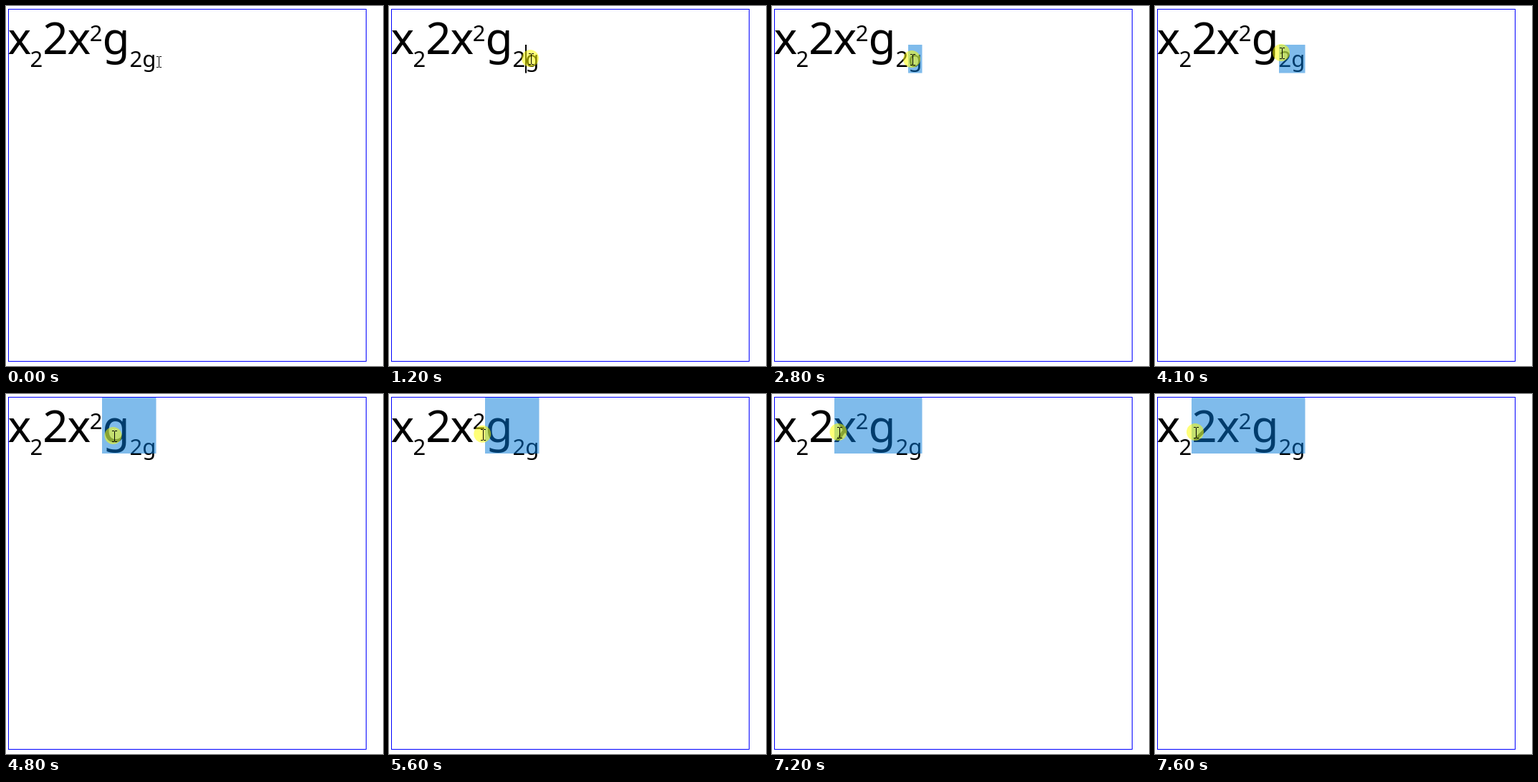
An HTML page with a canvas for the animation above (8000 ms loop, 526 by 502 pixels).

```html
<!DOCTYPE html>
<html lang="en">
<head>
<meta charset="utf-8">
<title>Text selection</title>
<style>
html, body { margin: 0; width: 100%; height: 100%; overflow: hidden; background: #fff; }
canvas { display: block; }
</style>
</head>
<body>
<canvas id="stage" width="526" height="502"></canvas>
<script>
const ctx = document.getElementById('stage').getContext('2d');
const LOOP = 8000, STEP = 100, END = 209.5;

// Text runs: baseline, font size, and the selection's top and bottom when it starts there
const BIG = { base: 67, size: 62, top: 5, bottom: 83 };
const SUB = { base: 85, size: 31, top: 54, bottom: 93.5 };
const SUP = { base: 49, size: 31, top: 18, bottom: 93.5 };

const glyphs = [
  ['x', 4, BIG], ['2', 33.6, SUB], ['2', 51.3, BIG], ['x', 86.8, BIG],
  ['2', 116.8, SUP], ['g', 134.3, BIG], ['2', 172.6, SUB], ['g', 190.3, SUB]
].map(([char, left, run], i, all) => {
  const right = i + 1 < all.length ? all[i + 1][1] : END;
  return { char, left, run, mid: (left + right) / 2 };
});

// Pointer path: time, x, y
const path = [
  [0, 211.5, 77], [300, 201, 74], [600, 201, 74], [700, 199.5, 73],
  [900, 199.5, 73], [1200, 197, 73], [1500, 197, 73], [2000, 204, 74],
  [2100, 204, 74], [2200, 206, 74], [2300, 206, 74], [2800, 195, 74],
  [2900, 195, 74], [3300, 184, 70], [3400, 184, 70], [3600, 179.8, 69],
  [3800, 179.8, 69], [4100, 176, 65], [4700, 152.1, 58], [4800, 149.5, 58],
  [5000, 148, 58], [5200, 148, 58], [5900, 117, 54], [6200, 117, 54],
  [6300, 116.5, 53.5], [6400, 116.5, 53.5], [6700, 94, 53], [7100, 94, 53],
  [7200, 92.5, 53], [7300, 92.5, 53], [7600, 56, 53], [LOOP, 56, 53]
];

const within = (t, from, to) => t >= from && t < to;

function pointerAt(t) {
  const i = path.findIndex(key => key[0] > t);
  const [t0, x0, y0] = path[i - 1], [t1, x1, y1] = path[i];
  const k = (t - t0) / (t1 - t0);
  return { x: x0 + (x1 - x0) * k, y: y0 + (y1 - y0) * k };
}

function drawText() {
  ctx.fillStyle = '#000';
  ctx.textAlign = 'center';
  for (const { char, mid, run } of glyphs) {
    ctx.font = `${run.size}px "Noto Sans", sans-serif`;
    ctx.fillText(char, mid, run.base);
  }
}

function drawSelection(mouseX) {
  const first = glyphs.find(glyph => glyph.mid > mouseX);
  if (!first) return;
  const { top, bottom } = first.run, left = Math.round(first.left);
  ctx.fillStyle = 'rgba(0, 120, 215, .5)';
  ctx.fillRect(left, top, END - left, bottom - top);
}

function drawCaret(x) {
  ctx.fillStyle = '#000';
  ctx.fillRect(x, 54, 2, 39.5);
}

function drawPointer({ x, y }, pressed) {
  if (pressed) {
    ctx.fillStyle = 'rgba(255, 255, 0, .53)';
    ctx.beginPath();
    ctx.arc(x, y, 12, 0, Math.PI * 2);
    ctx.fill();
  }
  const cx = Math.floor(x + 1.5) + 0.5, cy = Math.round(y + 1);
  ctx.strokeStyle = '#000';
  ctx.beginPath();
  ctx.moveTo(cx, cy - 7);
  ctx.lineTo(cx, cy + 7);
  for (const side of [-7.5, 7.5]) {
    ctx.moveTo(cx - 3.5, cy + side);
    ctx.lineTo(cx - 0.5, cy + side);
    ctx.moveTo(cx + 0.5, cy + side);
    ctx.lineTo(cx + 3.5, cy + side);
  }
  ctx.stroke();
}

function draw(now) {
  const t = Math.floor(now % LOOP / STEP) * STEP;
  const pointer = pointerAt(t);
  ctx.fillStyle = '#fff';
  ctx.fillRect(0, 0, 526, 502);
  ctx.lineWidth = 1;
  ctx.strokeStyle = '#00f';
  ctx.strokeRect(3.5, 4.5, 499, 491);
  drawText();
  if (t >= 2200) drawSelection(pointer.x + 1.5);
  if (within(t, 100, 700) || within(t, 2200, 2500)) drawCaret(208.5);
  if (within(t, 700, 1900)) drawCaret(190);
  drawPointer(pointer, within(t, 700, 1600) || t >= 2200);
  requestAnimationFrame(draw);
}
requestAnimationFrame(draw);
</script>
</body>
</html>
```
